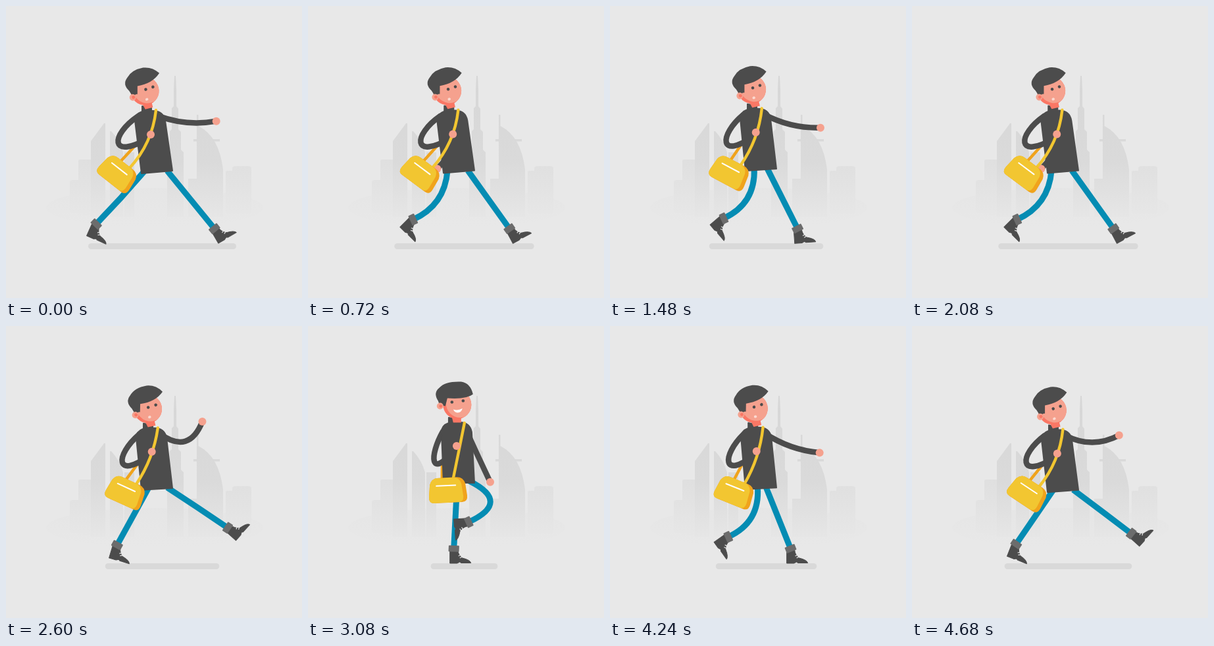
Animation of 450 by 443 pixels, one loop 4.76 s. Source, as an HTML page:

```html
<!DOCTYPE html>
<html lang="en">
<head>
<meta charset="utf-8">
<title>City walk</title>
<style>
html, body { margin: 0; width: 100%; height: 100%; overflow: hidden; background: #e8e8e8; }
svg { display: block; width: 100%; height: 100%; }
.leg, .arm, .strap { fill: none; stroke-linecap: round; }
.leg { stroke: #048cb3; stroke-width: 9; stroke-linecap: butt; }
.arm { stroke: #4c4c4c; stroke-width: 8.5; }
.strap { stroke: #f2c631; stroke-width: 4.4; }
.dark { fill: #4c4c4c; }
.skin { fill: #f5a18e; }
.shade { fill: #fa7765; }
</style>
</head>
<body>
<svg viewBox="0 0 450 443" preserveAspectRatio="none">
  <defs>
    <linearGradient id="haze" gradientUnits="userSpaceOnUse" x1="0" y1="110" x2="0" y2="320">
      <stop offset="0" stop-color="#d7d7d7"/>
      <stop offset=".6" stop-color="#dadada"/>
      <stop offset="1" stop-color="#e6e6e6"/>
    </linearGradient>
    <linearGradient id="mist" gradientUnits="userSpaceOnUse" x1="0" y1="230" x2="0" y2="335">
      <stop offset="0" stop-color="#dfdfdf"/>
      <stop offset="1" stop-color="#e8e8e8"/>
    </linearGradient>
    <clipPath id="faceClip"><circle r="21.500"/></clipPath>
    <path id="bagShape" d="M-14 -19H14Q24 -19 27 -9L29 9Q30 19 21 19H-21Q-30 19 -29 9L-27 -9Q-24 -19 -14 -19Z"/>
    <clipPath id="bagClip"><use href="#bagShape"/></clipPath>
    <g id="boot">
      <path class="dark" d="M-6 2H6Q7 10 13 14Q25 17 26 21.500H11L9 20L5 22H-6Z" stroke="#4c4c4c" stroke-linejoin="round"/>
      <path d="M7 11l4 -2M9 14l4 -2" stroke="#e8e8e8" stroke-width="1.200"/>
    </g>
  </defs>

  <rect width="450" height="443" fill="#e8e8e8"/>
  <g fill="url(#mist)">
    <ellipse cx="226" cy="306" rx="165" ry="30" opacity=".5"/>
    <rect x="110" y="233" width="22" height="85" rx="2"/>
    <rect x="97" y="264" width="21" height="50" rx="4"/>
    <rect x="334" y="250" width="14" height="65" rx="2"/>
    <rect x="344" y="243" width="29" height="72" rx="4"/>
  </g>
  <g fill="url(#haze)">
    <path d="M129 320V205L149 178H151V320Z"/>
    <path d="M158 320V190H160Q173 204 178 222V320Z"/>
    <path d="M180 320V222H195V320ZM277 320V262H290V320Z"/>
    <path d="M245 320V220L249 218V190L252 187V155L255 152V128L256 106H258L259 128V152L262 156V187L266 191V218L270 222V320Z"/>
    <path d="M290 320V165H292.500V182Q324 198 330 248V320Z"/>
    <path d="M285 202H325V205.500H285Z"/>
  </g>

  <rect id="shadow" y="360" height="9" rx="4.500" fill="#d9d9d9"/>
  <g id="legs"></g>
  <path id="freeArm" class="arm"/>
  <circle id="freeHand" class="skin" r="6"/>
  <path id="backStrap" class="strap" style="stroke:#f0a31c"/>
  <path id="holdArm" class="arm"/>
  <path id="torso" class="dark" stroke="#4c4c4c" stroke-width="2" stroke-linejoin="round"/>
  <path id="strap" class="strap"/>
  <g id="bag">
    <use href="#bagShape" fill="#f0a31c"/>
    <g clip-path="url(#bagClip)"><use href="#bagShape" x="-6" fill="#f2c631"/></g>
    <path d="M-17 -7H12" stroke="#fff" stroke-width="2" stroke-linecap="round"/>
  </g>
  <circle id="holdHand" class="skin" r="6"/>
  <g id="head">
    <path class="shade" d="M-9 15H6V27H-6Z"/>
    <circle class="shade" r="21.500"/>
    <g clip-path="url(#faceClip)"><circle class="skin" cx="4.500" cy="-2" r="21.500"/></g>
    <path id="hair" class="dark"/>
    <g id="ear"><circle class="skin" r="5"/><circle class="shade" cx="1" r="2.400"/></g>
    <circle id="eyeL" class="dark" r="2.300"/>
    <circle id="eyeR" class="dark" r="2.300"/>
    <path id="mouth"/>
  </g>
</svg>
<script>
const FRAME = 40, LOOP = 4760, STRIDE = 34;
const LEG_LENGTH = 111, ARM_LENGTH = 88;

const $ = id => document.getElementById(id);
const set = (id, attrs) => { for (const k in attrs) $(id).setAttribute(k, attrs[k]); };
const mix = (a, b, k) => a + (b - a) * k;

// Smooth 0 to 1 between two times; swap them for a fall
function ramp(t, from, to) {
  const k = Math.min(1, Math.max(0, (t - from) / (to - from)));
  return k * k * (3 - 2 * k);
}

// Point beside the middle of a limb, pushed out at a right angle
function joint(ax, ay, bx, by, push) {
  const d = Math.hypot(bx - ax, by - ay) || 1;
  return [(ax + bx) / 2 + push * (by - ay) / d, (ay + by) / 2 - push * (bx - ax) / d];
}

// Planted foot slides back while the heel peels off the ground
const stance = p => ({
  hip: mix(245, 211, p),
  x: mix(317, 137, p),
  y: 338 - 7 * ramp(p, .65, .9),
  turn: -30 * ramp(p, .22, .03) + 24 * ramp(p, .6, .95)
});

// Free foot tucks up, kicks past its landing place and drops
const swing = p => ({
  hip: mix(211, 245, ramp(p, 0, .55)),
  x: mix(137, 317, p) + 12 * ramp(p, 0, .05) * ramp(p, .25, .06)
    + 52 * ramp(p, .4, .82) * ramp(p, 1, .82),
  y: mix(331, 338, p) - 41 * Math.sin(Math.PI * p ** 1.6) - 6 * ramp(p, 0, .05) * ramp(p, .25, .06),
  turn: 24 + 25 * ramp(p, 0, .08) + 37 * ramp(p, .15, .5)
    - 134 * ramp(p, .53, .82) + 18 * ramp(p, .88, 1)
});

function legMarkup({ hip, x, y, turn }, hipY, bends) {
  const slack = Math.max(0, LEG_LENGTH - Math.hypot(x - hip, y - hipY));
  const [kx, ky] = joint(hip, hipY, x, y, bends ? 1.35 * slack : 0);
  const lean = Math.atan2(y - ky, x - kx) * 180 / Math.PI - 90;
  return `<path class="leg" d="M${hip} ${hipY}Q${kx} ${ky} ${x} ${y}"/>
    <use href="#boot" transform="translate(${x} ${y}) rotate(${turn})"/>
    <rect x="-8" y="-5" width="16" height="9.500" rx="1" fill="#6c6c6c"
      transform="translate(${x} ${y}) rotate(${lean})"/>`;
}

function drawLegs(p, second, lift) {
  const hipY = mix(250, 235, lift);
  const legs = [legMarkup(stance(p), hipY, false), legMarkup(swing(p), hipY, true)];
  $('legs').innerHTML = (second ? legs.reverse() : legs).join('');
}

// Pendulum swing with the elbow folding as the arm comes forward
function drawFreeArm(s, sway, lift) {
  const fold = ramp(s, .58, .8) * ramp(s, .97, .84);
  const angle = (30 + 55 * Math.cos(2 * Math.PI * s) + 70 * fold) * Math.PI / 180;
  const reach = ARM_LENGTH - 50 * fold;
  const x = mix(232, 240, sway), y = mix(167, 157, lift);
  const hx = x + reach * Math.sin(angle), hy = y + reach * Math.cos(angle);
  const [ex, ey] = joint(x, y, hx, hy, 8 - 20 * Math.sin(angle) - 75 * fold);
  set('freeArm', { d: `M${x} ${y}Q${ex} ${ey} ${hx} ${hy}` });
  set('freeHand', { cx: hx, cy: hy });
}

function drawTorso(sway, lift) {
  const x = mix(214, 221, sway), y = mix(156, 143, lift);
  const hem = mix(250, 238, lift);
  set('torso', { d: `M${x - 7} ${y - 4}L${x + 7} ${y - 1}V${y + 3}
    Q${x + 25} ${y + 2} ${x + 28} ${y + 18}L253 ${hem}L206 ${hem + 4 * (1 - lift)}
    L${x - 18} ${y + 18}Q${x - 18} ${y + 8} ${x - 7} ${y + 4}Z` });
}

function drawBag(sway, lift) {
  const x = mix(170, 213, sway), y = mix(254, 249, lift), turn = mix(38, -3, lift);
  const r = turn * Math.PI / 180, c = Math.cos(r), s = Math.sin(r);
  const onBag = (u, v) => [x + u * c - v * s, y + u * s + v * c];
  const [fx, fy] = onBag(9, -17), [gx, gy] = onBag(-8, -17);
  const tx = mix(228, 238, sway), ty = mix(158, 147, lift);
  const hx = mix(220, 226, sway), hy = mix(195, 182, lift);
  const sx = mix(201, 205, sway), sy = mix(167, 160, lift), ex = mix(158, 185, sway);
  const [bx, by] = joint(tx, ty, fx, fy, 16 * (1 - lift));
  set('strap', { d: `M${tx} ${ty}Q${bx} ${by} ${fx} ${fy}` });
  set('backStrap', { d: `M${sx - 1} 208L${gx} ${gy}` });
  set('holdArm', { d: `M${sx} ${sy}C${ex} 196 ${ex} 234 ${hx - 4} ${hy + 6}` });
  set('holdHand', { cx: hx, cy: hy });
  set('bag', { transform: `translate(${x} ${y}) rotate(${turn})` });
}

function drawHead(sway, lift, face) {
  const x = mix(211, 227, sway), y = mix(129, 119.5, lift), back = -6 * face;
  set('head', { transform: `translate(${x} ${y}) rotate(${mix(-14, 0, face)})` });
  set('hair', { d: `M${back - 19} 6L${back - 23} -6Q${back - 31} -18 ${back - 21} -26
    Q${back - 12} -36 6 -35Q20 -33 ${mix(28, 24, face)} ${mix(-21, -16, face)}
    Q14 -8 ${back - 9} -10L${back - 12} 2Q${back - 16} 0 ${back - 19} 6Z` });
  set('ear', { transform: `translate(${back - 20} ${mix(5, 2, face)})` });
  set('eyeL', { cx: mix(2, -8, face), cy: mix(-2, -4, face) });
  set('eyeR', { cx: mix(13.5, 9, face), cy: mix(-3, -6, face) });
  const smile = face > .5;
  set('mouth', {
    transform: `translate(0 ${mix(13, 8, face)})`,
    fill: smile ? '#fff' : '#fbd9d0',
    d: smile ? 'M-6 -1Q1 1.500 8 -2.500Q6 4 1 4Q-4 4 -6 -1Z'
             : 'M-2.300 0A2.300 2 0 1 1 2.300 0A2.300 2 0 1 1 -2.300 0Z'
  });
}

function draw(s) {
  const second = s >= .5, p = s * 2 % 1;
  const sway = ramp(p, 0, .5) * ramp(p, 1, .5);
  const lift = ramp(p, 0, .55) * ramp(p, .95, .62);
  const face = ramp(p, .18, .5) * ramp(p, .86, .66);
  const gather = 62 * sway ** .7;
  set('shadow', { x: 125 + gather, width: 225 - 2 * gather });
  drawLegs(p, second, lift);
  drawFreeArm(s, sway, lift);
  drawTorso(sway, lift);
  drawBag(sway, lift);
  drawHead(sway, lift, face);
}

// The loop closes by cutting across to the opposite half of the stride
const LAST = LOOP / FRAME - 2;
let shown = -1;
function tick() {
  const frame = Math.min(LAST, Math.floor(performance.now() % LOOP / FRAME));
  if (frame !== shown) {
    shown = frame;
    draw(frame === LAST ? 1 - 2 / STRIDE : frame % STRIDE / STRIDE);
  }
  requestAnimationFrame(tick);
}
tick();
</script>
</body>
</html>
```
